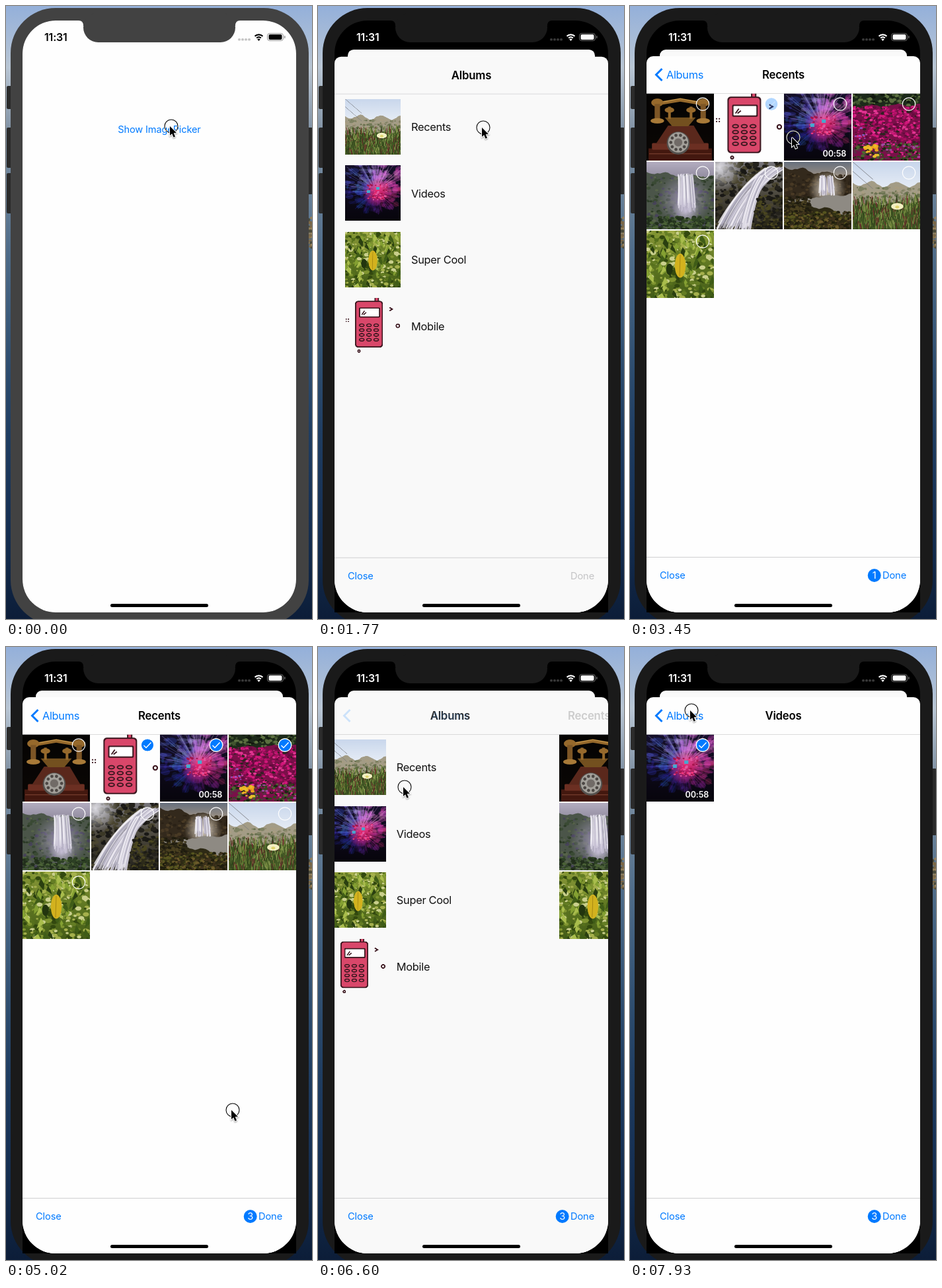
These frames come from a looping animation (463x928 px, 8000 ms). An HTML page with a canvas:

```html
<!DOCTYPE html>
<html lang="en">
<head>
<meta charset="utf-8">
<title>Image picker</title>
<style>
html, body { margin: 0; height: 100%; overflow: hidden; }
canvas { display: block; }
</style>
</head>
<body>
<canvas id="stage" width="463" height="928"></canvas>
<script>
const ctx = document.getElementById('stage').getContext('2d');
const BLUE = '#007aff', RULE = '#cfcfd1', LOOP = 8000;
const LEFT = 25, WIDTH = 414, TILE = 104, ROW = 100.5;
const clamp = v => Math.max(0, Math.min(1, v));
const mix = (a, b, p) => a + (b - a) * p;
const gray = v => `rgb(${v},${v},${v})`;
// critically damped spring, ms since start
const spring = ms => ms <= 0 ? 0 : 1 - (1 + ms * .01826) * Math.exp(-ms * .01826);

let seed = 1;
const rnd = (a = 0, b = 1) => mix(a, b, (seed = seed * 16807 % 2147483647) / 2147483647);

// ---------- shape helpers ----------
function trace(g, pts) {
  g.beginPath();
  for (let i = 0; i < pts.length; i += 2) g.lineTo(pts[i], pts[i + 1]);
}
function poly(g, color, ...pts) {
  g.fillStyle = color;
  trace(g, pts);
  g.fill();
}
function line(g, color, width, ...pts) {
  g.strokeStyle = color;
  g.lineWidth = width;
  trace(g, pts);
  g.stroke();
}
function dot(g, color, x, y, rx, ry = rx) {
  g.fillStyle = color;
  g.beginPath();
  g.ellipse(x, y, rx, ry, 0, 0, 7);
  g.fill();
}
function ring(g, color, width, x, y, rx, ry = rx) {
  g.strokeStyle = color;
  g.lineWidth = width;
  g.beginPath();
  g.ellipse(x, y, rx, ry, 0, 0, 7);
  g.stroke();
}
function box(g, color, x, y, w, h, r = 0) {
  g.fillStyle = color;
  g.beginPath();
  g.roundRect(x, y, w, h, r);
  g.fill();
}
function fade(g, colors, h) {
  const f = g.createLinearGradient(0, 0, 0, h), list = colors.split(' ');
  list.forEach((c, i) => f.addColorStop(i / (list.length - 1), c));
  return f;
}

// ---------- photo textures in a 100 x 100 space ----------
function glow(g, color, x, y, r) {
  const f = g.createRadialGradient(x, y, 0, x, y, r);
  f.addColorStop(0, color);
  f.addColorStop(1, color + '00');
  dot(g, f, x, y, r);
}
// random flecks between two heights
function flecks(g, n, top, bottom, r, colors, left = 0, right = 100) {
  const list = colors.split(' ');
  for (let i = 0; i < n; i++) {
    const k = r * rnd(.4, 1.2);
    dot(g, list[i % list.length], rnd(left, right), rnd(top, bottom), k, k * .7);
  }
}
// ground below a wavy line that runs from height a to height b
function hill(g, color, a, b, wave = 2) {
  const pts = [100, 101, 0, 101];
  for (let x = 0; x <= 100; x += 4) pts.push(x, mix(a, b, x / 100) + wave * Math.sin(x * .17) + rnd(-1, 1));
  poly(g, color, ...pts);
}
// falling water: strands curving from (x, y) to (x2, y2), spread sideways
function water(g, x, y, x2, y2, spread) {
  g.lineWidth = 1.6;
  for (let i = 0; i < 60; i++) {
    const d = rnd(-spread, spread);
    g.strokeStyle = ['#f4f2f8cc', '#d5d1e0aa', '#a9a5b8aa'][i % 3];
    g.beginPath();
    g.moveTo(x + d, y + rnd(-3, 3));
    g.quadraticCurveTo(mix(x, x2, .6) + d, mix(y, y2, .3), x2 + d * 1.2, y2 + rnd(-8, 8));
    g.stroke();
  }
}

function photo(background, paint) {
  const c = document.createElement('canvas'), g = c.getContext('2d');
  c.width = c.height = 204;
  g.scale(2.04, 2.04);
  if (background) box(g, fade(g, background, 100), 0, 0, 100, 100);
  seed = 77;
  paint(g);
  return c;
}

const antique = photo('#050403 #0b0705', g => {
  const gold = '#96692c', wood = '#6b2f22';
  box(g, '#43180f', 3, 82, 94, 18);
  box(g, wood, 8, 74, 84, 10, 2);
  poly(g, '#5a281c', 32, 48, 70, 48, 86, 75, 14, 75);
  line(g, '#824534', 1, 4, 90, 96, 90);
  line(g, gold, 5, 20, 15, 50, 10, 80, 15);
  line(g, '#d0a052', 1, 24, 13, 50, 8, 76, 13);
  poly(g, '#73501f', 27, 36, 73, 36, 62, 49, 38, 49);
  for (const side of [-1, 1]) {
    const x = 50 + side * 34, stem = 50 + side * 16;
    dot(g, gold, x, 14, 9, 6);
    box(g, '#7d5626', x - 4, 16, 8, 24);
    dot(g, '#a87a38', x, 41, 10, 4);
    line(g, gold, 4, stem, 20, stem, 38);
    dot(g, gold, stem, 25, 7, 4);
  }
  dot(g, '#55524f', 47, 74, 17);
  dot(g, '#a3a09a', 47, 73, 15);
  for (let a = 0; a < 6.2; a += .628)
    dot(g, '#4c4744', 47 + 11 * Math.cos(a), 73 + 11 * Math.sin(a), 2.3);
  dot(g, '#716b67', 47, 73, 6);
});

const mobile = photo('', g => {
  const ink = '#3c1820', pink = '#d9476a';
  const part = (color, x, y, w, h, r) => {
    box(g, ink, x, y, w, h, r + 1);
    box(g, color, x + 2, y + 2, w - 4, h - 4, r);
  };
  part(pink, 53, -3, 8, 14, 1);
  part(pink, 18, 5, 50, 84, 4);
  part('#fff', 25, 17, 38, 18, 1);
  for (const h of [7, 4]) line(g, ink, 1.8, 37 - h, 30, 42 - h, 30 - h);
  for (let i = 0; i < 12; i++)
    ring(g, ink, 1.8, 30 + i % 3 * 13, 49 + (i / 3 | 0) * 8.7, 4.2, 2.4);
  ring(g, ink, 2.2, 95, 50, 3);
  ring(g, ink, 2, 25, 95.5, 2);
  line(g, ink, 2.2, 80, 17, 85, 20, 80, 23);
  for (let i = 0; i < 4; i++) dot(g, ink, 2 + i % 2 * 4, 38 + (i >> 1) * 4, 1.1);
});

const burst = photo('#15102a #07050c', g => {
  // colour turns with the angle: blue on the left, lilac above, magenta on the right
  for (let i = 0; i < 260; i++) {
    const a = rnd(0, 6.28), reach = rnd(8, 52) * (1 - .25 * Math.sin(a));
    const hue = 275 + 50 * Math.cos(a) + rnd(-20, 20);
    const light = 45 - 22 * Math.sin(a) + rnd(-12, 12);
    g.globalAlpha = .3;
    dot(g, `hsl(${hue},60%,${light}%)`, 55 + reach * Math.cos(a), 46 + reach * Math.sin(a), rnd(2, 9), rnd(2, 6));
    line(g, `hsl(${hue},65%,${light + 12}%)`, 1, 55, 46, 55 + reach * 1.15 * Math.cos(a), 46 + reach * 1.15 * Math.sin(a));
  }
  g.globalAlpha = 1;
  glow(g, '#e0246a', 56, 48, 26);
  flecks(g, 70, 33, 62, 2, '#f0377b #a3164e #e05aa0', 38, 76);
  for (const [x, y] of [[56, 39], [39, 45]]) box(g, '#46a9cf', x, y, 6, 5);
});

const flowers = photo('#1b2818 #2b3d1c', g => {
  flecks(g, 160, 0, 20, 3, '#1c2a1b #41552f #5c7040 #10180d');
  hill(g, '#7a1049', 20, 17);
  flecks(g, 520, 20, 78, 2.4, '#d3187c #a80e60 #e23592 #650a3e #b9126b #2c2420');
  flecks(g, 200, 74, 100, 2.5, '#33481f #4c6730 #1b2913 #5d2a45');
  flecks(g, 40, 74, 95, 2, '#d92588 #a2469f', 40);
  flecks(g, 25, 76, 94, 3, '#f2a51e #e8c02d', 18, 38);
  flecks(g, 10, 50, 76, 2, '#a352c4 #8a54bd', 4, 25);
});

const greenFalls = photo('#b3adc0 #857f92 #4e5a48 #2b3a24', g => {
  hill(g, '#4b5549', 16, 22);
  flecks(g, 260, 22, 100, 3, '#3a4a34 #57634a #47435a #2c3b27');
  glow(g, '#9b93b0', 56, 55, 40);
  water(g, 58, 20, 60, 68, 11);
  glow(g, '#c5bed4', 58, 72, 20);
  flecks(g, 220, 82, 100, 3, '#2d4024 #4a6136 #222f1c');
});

const rockFalls = photo('#77757a #4b473c #23211b', g => {
  flecks(g, 360, 0, 100, 4, '#24221c #3b3826 #191815 #4a4530');
  glow(g, '#dcdbe2', 6, 8, 34);
  water(g, 88, 10, 18, 98, 14);
  water(g, 70, 22, 44, 95, 7);
  flecks(g, 160, 50, 100, 3, '#2d2b1a #4a4620 #1c1b16', 60);
});

const duskFalls = photo('#68717e #b59f86 #6f6759 #2b2817', g => {
  hill(g, '#33291c', 8, 22, 3);
  flecks(g, 150, 18, 50, 3, '#2a2116 #493a25 #3b3020');
  glow(g, '#e9dfd0', 64, 40, 28);
  water(g, 62, 22, 63, 46, 10);
  hill(g, '#8e8a83', 56, 48, 1);
  hill(g, '#2e2a15', 54, 80, 3);
  flecks(g, 420, 74, 100, 2.5, '#333315 #55541f #1f1d0d #6b5a2a #40331d');
  flecks(g, 150, 52, 76, 2.5, '#2a2415 #4a4020 #1f1c0f', 0, 40);
});

const dunes = photo('#c9d7ec #eef2f8 #e6e9ec', g => {
  hill(g, '#a39c86', 32, 34, 4);
  flecks(g, 160, 38, 66, 3, '#7f8263 #a89d82 #6b7351 #918b70');
  hill(g, '#3f5423', 64, 60, 2);
  for (let i = 0; i < 420; i++) {
    const x = rnd(0, 100), y = rnd(60, 104);
    line(g, ['#4c6329', '#6f8539', '#2c3f19', '#8a9a52', '#6b2c2b'][i % 5], 1, x, y, x + rnd(-3, 3), y - rnd(6, 14));
  }
  for (const y of [0, 14]) line(g, '#76787d', .6, 0, y, 30, y + 26);
  dot(g, '#f3f0c2', 66, 66, 9, 5);
  dot(g, '#dfd36c', 66, 67, 3, 2);
});

const leaves = photo('#8c9a3a #5f7722 #445c18', g => {
  flecks(g, 420, 0, 100, 4, '#56701c #7f9430 #33490f #a5b04c #c9cf8c #647d24');
  for (let i = 0; i < 60; i++) {
    const x = rnd(0, 100), y = rnd(0, 100), s = rnd(4, 9), lean = rnd(-1, 1) * s;
    poly(g, ['#84a032', '#3f5c17', '#a9bd4c', '#2a3f10'][i % 4], x, y, x + s * .6, y + s, x + lean, y + s * 2, x - s * .4, y + s);
  }
  dot(g, '#d3b21e', 50, 52, 8, 18);
  line(g, '#a98a14', 1, 50, 36, 49, 68);
  dot(g, '#22350e', 34, 57, 5, 8);
});

const albums = { Recents: dunes, Videos: burst, 'Super Cool': leaves, Mobile: mobile };
const recents = [antique, mobile, burst, flowers, greenFalls, rockFalls, duskFalls, dunes, leaves];
const picks = new Map([[mobile, 3400], [burst, 4060], [flowers, 4440]]);

// ---------- interface ----------
function text(s, x, y, size, color, align = 'center', weight = 400) {
  ctx.font = `${weight} ${size}px Inter, "Liberation Sans", sans-serif`;
  ctx.letterSpacing = weight > 500 ? '-0.2px' : size > 15 ? '-0.3px' : '-0.15px';
  ctx.textAlign = align;
  ctx.fillStyle = color;
  ctx.fillText(s, x, y + size * .36);
}
function layer(draw, alpha = 1, dy = 0) {
  ctx.save();
  ctx.globalAlpha *= alpha;
  ctx.translate(0, dy);
  draw();
  ctx.restore();
}

function desktop() {
  box(ctx, fade(ctx, '#94b0da #b9c6d4 #8394a6 #6a8299 #4f6c89 #3d5c7c #2c4b6d #1f3d61 #183357 #122a4b #0c1d38', 928), 0, 0, 463, 928);
  seed = 9;
  flecks(ctx, 40, 320, 366, 3, '#7b6848 #95805a #4a4a3b', 457, 463);
}

function bezel(color) {
  const button = (x, y, h) => box(ctx, '#2b2b2b', x, y, 8, h, 2);
  button(1, 121, 35);
  button(1, 184, 61);
  button(1, 253, 61);
  button(456, 184, 101);
  box(ctx, color, 7, 3, 451, 934, 68);
}

function notch(color) {
  box(ctx, color, 117, 10, 230, 45, 25);
  // small fillets where the notch meets the screen edge
  for (const [x, dir] of [[117, -1], [347, 1]]) {
    ctx.beginPath();
    ctx.moveTo(x - dir * 25, 21);
    ctx.lineTo(x + dir * 7, 21);
    ctx.lineTo(x + dir * 7, 22);
    ctx.quadraticCurveTo(x, 22, x, 30);
    ctx.lineTo(x - dir * 25, 30);
    ctx.fill();
  }
}

function statusBar(v) {
  const color = gray(255 * v);
  text('11:31', 58, 47, 16, color, 'left', 600);
  layer(() => {
    for (let i = 0; i < 4; i++) box(ctx, color, 351 + i * 5, 49, 4, 3.5, 1.5);
  }, .22);
  for (const r of [4.8, 8.7]) {
    ctx.strokeStyle = color;
    ctx.lineWidth = 2.2;
    ctx.beginPath();
    ctx.arc(382.5, 52, r, -2.33, -.81);
    ctx.stroke();
  }
  poly(ctx, color, 382.5, 53, 380.2, 50.2, 382.5, 49.2, 384.8, 50.2);
  box(ctx, color, 397.5, 43, 20, 8, 2);
  layer(() => {
    ctx.lineWidth = 1;
    ctx.beginPath();
    ctx.roundRect(395.5, 41.5, 24, 11, 3.5);
    ctx.stroke();
    box(ctx, color, 421, 45, 1.5, 4, 1);
  }, .42);
}

function tick(x, y, a) {
  const edge = () => ring(ctx, '#fff', 1.2, x, y, 9.7);
  edge();
  layer(() => {
    dot(ctx, BLUE, x, y, 9.4);
    edge();
    line(ctx, '#fff', 1.4, x - 5.5, y + .5, x - 2, y + 4, x + 5.5, y - 4);
  }, a);
}

function grid(photos, x0, t) {
  photos.forEach((img, i) => {
    const x = x0 + i % 4 * TILE, y = 132 + (i / 4 | 0) * TILE;
    ctx.drawImage(img, x, y, 102, 102);
    if (img === burst) text('00:58', x + 94, y + 91, 12.6, '#fff', 'right', 600);
    tick(x + 85, y + 16.5, picks.has(img) ? clamp((t - picks.get(img)) / 170) : 0);
  });
}

function albumList(x0, selected) {
  if (selected >= 0) {
    box(ctx, '#c9c9ce', LEFT, 132 + selected * ROW, WIDTH, 101);
    for (let i = 1; i < 7; i++) box(ctx, RULE, LEFT, Math.floor(132 + i * ROW), WIDTH, 1);
  }
  Object.entries(albums).forEach(([name, img], i) => {
    const y = 140 + i * ROW;
    ctx.drawImage(img, x0 + 16, y, 84, 84);
    text(name, x0 + 116, y + 42.5, 16.4, '#111', 'left');
  });
}

// Draws the sheet at its resting place, top edge at 76.
function sheet(t) {
  const pops = t >= 6429 && t < 7130, again = t >= 7130;
  const p = pops ? 1 - spring(t - 6429) : spring(t - (again ? 7130 : 2510));
  const q = 1 - p, back = gray(249 + 5 * p ** 8);
  box(ctx, back, LEFT, 76, WIDTH, 900, [10, 10, 0, 0]);

  if (p < .999) albumList(LEFT - 124 * p, pops || p === 0 ? -1 : +again);
  if (p > 0) {
    const x = LEFT + WIDTH * q;
    box(ctx, back, x, 132, WIDTH, 702);
    grid(again ? [burst] : recents, x, t);
  }

  // navigation bar
  box(ctx, RULE, LEFT, 132, WIDTH, .8);
  const x = 83 + 149 * q - 6 * Math.sin(2 * Math.PI * p);
  const title = (s, x) => text(s, x, 104, 16.8, '#000', 'center', 600);
  layer(() => title('Albums', x), q);
  layer(() => {
    text('Albums', x, 104, 16.4, BLUE);
    line(ctx, BLUE, 3, 48.5, 95, 39.5, 104, 48.5, 113);
    title(again ? 'Videos' : 'Recents', 232 + q * (286 - 84 * q));
  }, p);

  // toolbar
  box(ctx, back, LEFT, 834, WIDTH, 100);
  box(ctx, RULE, LEFT, 834, WIDTH, 1);
  const count = [...picks.values()].filter(at => t >= at).length;
  text('Close', 45, 862, 14.7, BLUE, 'left');
  text('Done', 382, 862, 14.7, count ? BLUE : '#c4c4c6', 'left');
  if (count) {
    dot(ctx, BLUE, 369.7, 862, 10);
    text(count, 369.7, 862, 14.7, '#fff');
  }
}

// pointer moves: start, duration, x, y
const moves = [
  [2120, 230, 251, 204], [2640, 360, 206, 196], [3380, 70, 247, 199], [3450, 350, 317, 186],
  [4140, 120, 400, 185], [4850, 170, 343, 701], [5260, 190, 338, 779], [5450, 440, 215, 229],
  [6070, 230, 80, 108], [6430, 170, 131, 212], [6880, 170, 136, 242], [7690, 240, 93, 96]
];

function pointer(t) {
  let x = 250, y = t < 1010 ? 182 : 184;
  for (const [start, duration, toX, toY] of moves) {
    const p = clamp((t - start) / duration), e = p * p * (3 - 2 * p);
    x = mix(x, toX, e);
    y = mix(y, toY, e);
  }
  layer(() => {
    ctx.globalCompositeOperation = 'difference';
    ring(ctx, '#fff', 1.1, x, y, 10);
  });
  layer(() => {
    ctx.translate(x - 2, y);
    ctx.shadowColor = '#0006';
    ctx.shadowBlur = 2;
    ctx.shadowOffsetY = 1;
    const arrow = [0, 0, 0, 14, 3.2, 11.2, 5.5, 16.8, 8, 15.7, 5.7, 10.3, 10, 10];
    line(ctx, '#fff', 2, ...arrow, 0, 0);
    ctx.shadowColor = 'transparent';
    poly(ctx, '#000', ...arrow);
  });
}

// The first screen shrinks behind the sheet.
function firstScreen(t, rise) {
  const s = 1 - rise * 40 / WIDTH;
  ctx.translate(232, 22 + 44 * rise);
  ctx.scale(s, s);
  box(ctx, gray(mix(254, 249, rise)), -WIDTH / 2, 0, WIDTH, 960, rise > 0 ? 10 : 0);
  const label = `rgb(${142 * rise},${mix(122, 150, rise)},${mix(255, 170, rise)})`;
  layer(() => text('Show ImagePicker', 0, 164.5, 14.6, label), t > 1070 && t < 1250 ? .4 : 1);
}

function draw(t) {
  const frame = t < 1010 ? '#424242' : '#1a1a1a';
  const rise = spring(t - 1250);
  desktop();
  bezel(frame);
  if (t > 1770) box(ctx, '#000', LEFT, 860, WIDTH, 58);

  layer(() => {
    ctx.beginPath();
    ctx.roundRect(LEFT, 22, WIDTH, 896, 50);
    ctx.clip();
    box(ctx, '#000', LEFT, 22, WIDTH, 896);
    layer(() => firstScreen(t, rise));
    statusBar(clamp((t - 1330) / 210));
    if (rise > 0) layer(() => sheet(t), 1, 842 * (1 - rise));
    box(ctx, '#000', 158, 905, 148, 5, 2.5);
  });

  notch(frame);
  pointer(t);
}

const start = performance.now();
(function loop() {
  draw((performance.now() - start) % LOOP);
  requestAnimationFrame(loop);
})();
</script>
</body>
</html>
```
